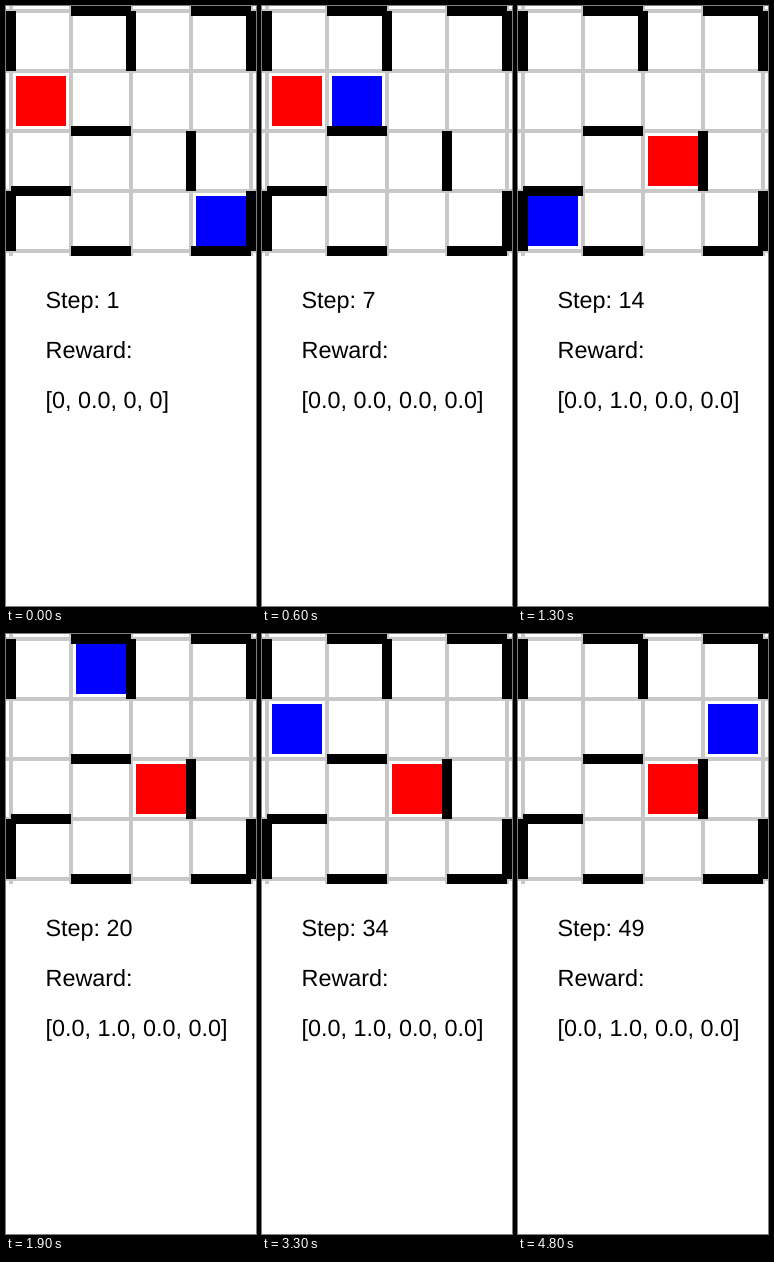
Recreate the animation shown at these times as an HTML page. Size 250 px wide and 600 px high, loop 4.9 s.

```html
<!DOCTYPE html>
<html lang="en">
<head>
<meta charset="utf-8">
<title>Grid walk</title>
<style>
  html, body { margin: 0; width: 100%; height: 100%; overflow: hidden; background: #fff; }
  svg { display: block; }
  text { font: 23.4px "Liberation Sans", Arial, sans-serif; text-rendering: geometricPrecision; white-space: pre; }
</style>
</head>
<body>
<svg width="250" height="600" viewBox="0 0 250 600">
  <path id="grid" stroke="#c8c8c8" stroke-width="4"/>
  <path id="walls" stroke="#000" stroke-width="10"/>
  <rect id="goal" width="50" height="50" fill="#f00"/>
  <rect id="agent" width="50" height="50" fill="#00f"/>
  <text id="step" x="39.5" y="301.5"></text>
  <text x="39.5" y="351.5">Reward:</text>
  <text id="reward" x="39.5" y="401.5"></text>
</svg>
<script>
const STEP_MS = 100, SIZE = 4, CELL = 60, EDGE = 5;
const $ = id => document.getElementById(id);
const at = i => EDGE + i * CELL;
const wrap = i => (i + SIZE) % SIZE;
const same = (a, b) => a[0] === b[0] && a[1] === b[1];

// Cells whose top or left side is closed; the grid wraps around at its borders.
const topWalls = [[1, 0], [3, 0], [1, 2], [0, 3]];
const leftWalls = [[0, 0], [2, 0], [3, 2], [0, 3]];

// Reward slots follow the order up, down, left, right.
const MOVES = { U: [0, -1], D: [0, 1], L: [-1, 0], R: [1, 0] };
const SLOTS = Object.keys(MOVES);
const firstEpisode = { agent: [3, 3], goal: [0, 1], actions: "DRULULLURULLD" };
const secondEpisode = { agent: [0, 3], goal: [2, 2], actions: "LDLRRULLULURDDLULUDDLURULLUDLLRURUD" };

// A move into a wall leaves the agent where it is.
function move([col, row], action) {
  const [dx, dy] = MOVES[action];
  const next = [wrap(col + dx), wrap(row + dy)];
  const edge = dx + dy > 0 ? next : [col, row];
  const blocked = (dx ? leftWalls : topWalls).some(wall => same(wall, edge));
  return blocked ? [col, row] : next;
}

function simulate() {
  const totals = [null, null, null, null];
  const states = [];
  let agent;
  const record = goal => states.push({
    agent, goal, reward: `[${totals.map(v => v === null ? "0" : v.toFixed(1)).join(", ")}]`
  });
  const play = ({ goal, actions }) => {
    for (const action of actions) {
      agent = move(agent, action);
      totals[SLOTS.indexOf(action)] += same(agent, goal) ? 1 : 0;
      record(goal);
    }
  };
  agent = firstEpisode.agent;
  play(firstEpisode);
  agent = secondEpisode.agent;
  record(secondEpisode.goal);
  play(secondEpisode);
  return states;
}

function drawBoard() {
  let lines = "", walls = "";
  for (let i = 0; i <= SIZE; i++) lines += `M${at(i)} 0V250M0 ${at(i)}H250`;
  const bothBorders = i => i === 0 ? [0, SIZE] : [i];
  for (const [c, r] of topWalls)
    for (const y of bothBorders(r)) walls += `M${at(c)} ${at(y)}h${CELL}`;
  for (const [c, r] of leftWalls)
    for (const x of bothBorders(c)) walls += `M${at(x)} ${at(r)}v${CELL}`;
  $("grid").setAttribute("d", lines);
  $("walls").setAttribute("d", walls);
}

function place(rect, [col, row]) {
  rect.setAttribute("x", at(col) + 5);
  rect.setAttribute("y", at(row) + 5);
}

const states = simulate();

function render(ms) {
  const index = Math.floor(ms / STEP_MS) % states.length;
  const { agent, goal, reward } = states[index];
  place($("agent"), agent);
  place($("goal"), goal);
  $("step").textContent = `Step: ${index + 1}`;
  $("reward").textContent = reward;
}

drawBoard();
const start = performance.now();
function tick() {
  render(performance.now() - start);
  requestAnimationFrame(tick);
}
tick();
</script>
</body>
</html>
```
